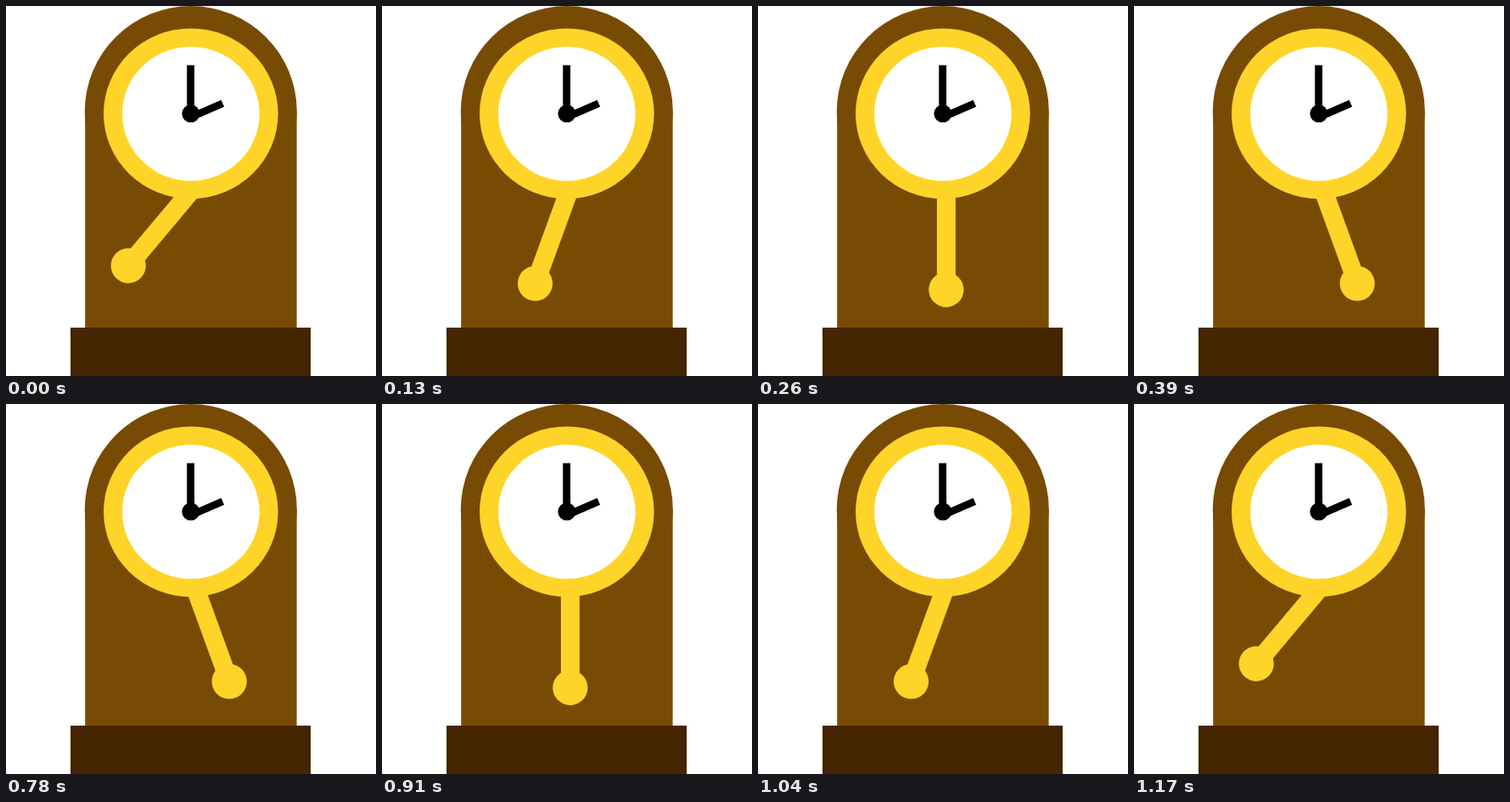
These frames come from a looping animation (436x436 px, 1300 ms). An HTML page:

```html
<!DOCTYPE html>
<html lang="en">
<head>
<meta charset="utf-8">
<title>Pendulum clock</title>
<style>
  html, body { margin: 0; width: 100%; height: 100%; overflow: hidden; background: #fff; }
  svg { display: block; width: 100%; height: 100%; }
</style>
</head>
<body>
<svg viewBox="0 0 436 436">
  <g fill="#784b04">
    <ellipse cx="217.8" cy="124.5" rx="125" ry="124.5"/>
    <rect x="93.2" y="124" width="249.4" height="256"/>
  </g>
  <rect x="76" y="379" width="283" height="57" fill="#452502"/>
  <g id="pendulum" fill="#ffd428">
    <rect x="210.8" y="213.5" width="22" height="121"/>
    <circle cx="221.8" cy="334.3" r="20.6"/>
  </g>
  <ellipse cx="217.8" cy="126.8" rx="102.8" ry="100.4" fill="#ffd428"/>
  <ellipse cx="217.8" cy="127" rx="80.8" ry="79" fill="#fff"/>
  <g stroke="#000" stroke-width="8.8">
    <path d="M217.6 127V69.7"/>
    <path d="M218 131L255.3 114.8"/>
  </g>
  <circle cx="217.8" cy="126.8" r="10.5"/>
</svg>
<script>
  const STEP = 130;
  const SWING = [40, 20, 0, -20, -40, -40, -20, 0, 20, 40];
  const pendulum = document.getElementById('pendulum');

  function draw() {
    const angle = SWING[Math.floor(performance.now() / STEP) % SWING.length];
    pendulum.setAttribute('transform', `rotate(${angle} 221.8 213.5)`);
    requestAnimationFrame(draw);
  }
  draw();
</script>
</body>
</html>
```
